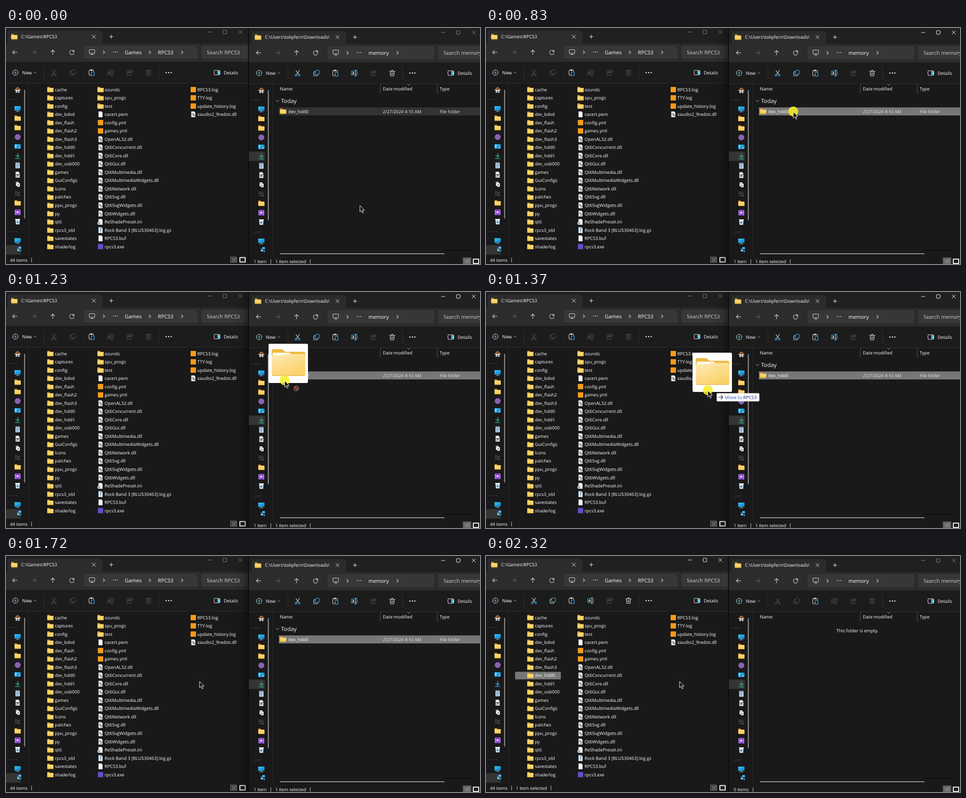
Recreate the animation shown at these times as an HTML page. Size 1058x529 px, loop 4.11 s.

```html
<!DOCTYPE html>
<html lang="en">
<head>
<meta charset="utf-8">
<title>Moving a folder between windows</title>
<style>
  html, body { margin: 0; width: 100%; height: 100%; overflow: hidden; background: #191919; }
  svg { display: block; }
  #stage { width: 100vw; height: 100vh; }
  text { font-family: "Open Sans", "Noto Sans", sans-serif; text-rendering: geometricPrecision; white-space: pre; }
</style>
</head>
<body>
<svg id="stage" viewBox="0 0 1058 529">
  <defs>
    <linearGradient id="gold" x2="0" y2="1"><stop stop-color="#ffe08a"/><stop offset="1" stop-color="#f7c242"/></linearGradient>
    <linearGradient id="pale" x2=".6" y2="1"><stop stop-color="#ffecb8"/><stop offset="1" stop-color="#fad06a"/></linearGradient>
    <linearGradient id="sky" x2="1" y2="1"><stop stop-color="#3cc8f4"/><stop offset="1" stop-color="#0f78c8"/></linearGradient>
    <linearGradient id="shade"><stop stop-opacity="0"/><stop offset=".6" stop-opacity=".08"/><stop offset="1" stop-opacity=".3"/></linearGradient>
  </defs>
</svg>
<script>
const LOOP = 4110, FOCUS = 560, DRAG = 1020, OVER = 1300, DROP = 1720, DONE = 1980, MOVED = 2180, TOOLS = 2250;
const WHITE = '#f4f4f4', BLUE = '#4cc2ff', DIM = '#565656', DIMBLUE = '#3f5566';

// Drawing helpers
const rect = (x, y, w, h, fill, r = 0, more = '') =>
  `<rect x="${x}" y="${y}" width="${w}" height="${h}" rx="${r}" fill="${fill}" ${more}/>`;
const frame = (x, y, w, h, c, r = 0, sw = 1) => rect(x, y, w, h, 'none', r, `stroke="${c}" stroke-width="${sw}"`);
const dot = (x, y, r, fill) => `<circle cx="${x}" cy="${y}" r="${r}" fill="${fill}"/>`;
const line = (d, c = WHITE, w = 1.1) =>
  `<path d="${d}" fill="none" stroke="${c}" stroke-width="${w}" stroke-linecap="round" stroke-linejoin="round"/>`;
const shape = (d, fill) => `<path d="${d}" fill="${fill}"/>`;
const text = (x, y, s, size = 10, fill = '#fff', more = '') =>
  `<text x="${x}" y="${y + size * .36}" font-size="${size}" fill="${fill}" ${more}>${s}</text>`;
const put = (x, y, s) => `<g transform="translate(${x} ${y})">${s}</g>`;
const during = (from, to, s) => `<g data-from="${from}" data-to="${to}">${s}</g>`;
const swap = (time, before, after) => during(0, time, before) + during(time, LOOP, after);
const dots = (x, y, gap, r) => [-gap, 0, gap].map(d => dot(x + d, y, r, WHITE)).join('');
const chevron = (x, y) => put(x, y, line('M-1.8-3.4L1.8 0L-1.8 3.4', '#ddd'));
const caret = (x, y, s = 2.5) => put(x, y, line(`M${-s} ${-s / 2}L0 ${s / 2}L${s} ${-s / 2}`, '#bbb', 1));
const cross = (x, y, s, c) => put(x, y, line(`M${-s} ${-s}L${s} ${s}M${s} ${-s}L${-s} ${s}`, c, 1));

// File icons, centred on the origin
const folder = shape('M-7-5.2Q-7-6-6-6H-2L0-4H6Q7-4 7-3V4H-7Z', '#e5a32b') + rect(-7, -3, 14, 9, 'url(#gold)', 1);
const page = shape('M-4.5-6.5H2L4.5-4V6.5H-4.5Z', '#f5f5f5') + shape('M2-6.5V-4H4.5Z', '#b5b5b5');
const gear = (x, y, r) => `<circle cx="${x}" cy="${y}" r="${r}" fill="none" stroke="#70757a" stroke-width="1.3"/>`;
const icons = {
  d: folder,
  p: page,
  s: rect(-6, -6, 12, 12, '#f59a1c', 1),
  g: page + gear(-1, -.8, 1.7) + gear(1.8, 2.6, 1.5),
  i: page + dot(-3.5, 3, 3.6, '#d5d5d5') + dot(-3.5, 3, 1.3, '#555'),
  z: page + rect(-1.5, -5, 3, 8, '#3b8fc4') + rect(-.5, -3, 1, 5, '#d6ecf8'),
  x: rect(-6, -6, 12, 12, '#5b50c8', 2)
};

// Navigation pane icons
const monitor = rect(-7, -6, 14, 10, 'url(#sky)', 1) + rect(-1, 4, 2, 2, '#8aa') + rect(-4, 5.5, 8, 1, '#9bb');
const arrowDown = c => line('M0-6V3M-4-1L0 3L4-1M-5 6H5', c, 1.5);
const note = rect(-5, -6, 10, 13, '#b9d2e6', 1) + line('M-3-2H3M-3 1H3M-3 4H1', '#55788f', 1) + rect(-5, -6, 10, 2, '#7fa3bf');
const home = rect(-4.5, -1, 9, 7, '#d0d0d0', 1) + line('M-6 0L0-5.5L6 0', '#e0843c', 2) + rect(-1.3, 2, 2.6, 4, '#555');
const display = rect(-7, -5, 14, 10, 'url(#sky)', 1) + rect(-5, -3, 2, 2, '#fff') + rect(-5, 1, 2, 2, '#fff') + rect(2, 2, 4, 1.5, '#cdf');
const tool = page + line('M-2 4L3-2M-3-1L2 3', '#333', 1.6);
const sheet = rect(-4, -5, 6, 9, '#eee') + rect(-1, -2, 6, 8, '#fff') + line('M0 1H3M0 3H3M-3-3H0', '#444', 1);
const term = rect(-6, -5, 12, 11, '#262a2e') + line('M-5-4H-2M-5-1H-3M0-1H3M-1 4H5', '#68798a', 1);
const film = rect(-6.5, -6.5, 13, 13, '#8a43d0', 1.5) + line('M-5-4V5M5-4V5', '#dcc3f5', 1.2) + shape('M-2-3L3 0L-2 3Z', '#fff');
const bin = shape('M-5-6H5L4 6H-4Z', '#d9e3ea') + dot(0, 1, 2.4, '#3d8fd1') + line('M-5-5.5H5', '#fff', 1.4);
const network = rect(0, -6, 7, 5, '#45b4ec') + rect(-3, 0, 5, 4, '#7dcaf0') + rect(3, 1, 5, 4, '#2d8fd0') + line('M-2-3V0', '#9cc');

// Command bar icons: a is the main colour, b the accent
const commands = {
  cut: (a, b) => line('M-4-6L2.6 3M4-6L-2.6 3', a) + line('M-5.6 4.8a2 2 0 1 0 4 0a2 2 0 1 0-4 0M1.6 4.8a2 2 0 1 0 4 0a2 2 0 1 0-4 0', b),
  copy: (a, b) => frame(-2.5, -6, 8.5, 9, b, 2, 1.1) + line('M-3-3.2H-4.5Q-6-3.2-6-1.7V4.4Q-6 6-4.5 6H1Q2.5 6 2.6 4', a),
  paste: (a, b) => line('M-1 6H-4Q-5.5 6-5.5 4.5V-4Q-5.5-5.5-4-5.5H3Q4.5-5.5 4.5-4V-3', a) + frame(-2.8, -7, 4.6, 2.4, a, 1) + frame(0, -1.5, 6, 8.5, b, 1.5, 1.2),
  rename: (a, b) => line('M1-4.5H-5Q-6.5-4.5-6.5-3V3Q-6.5 4.5-5 4.5H1M5-4.5Q6.5-4.5 6.5-3V3Q6.5 4.5 5 4.5', b) + line('M3-6.5V6.5M1.7-6.5H4.3M1.7 6.5H4.3M-4.3 2.5L-2.2-2.5L0 2.5M-3.5 .8H-.8', a),
  share: (a, b) => line('M-1-4H-4Q-5.5-4-5.5-2.5V4Q-5.5 5.5-4 5.5H3Q4.5 5.5 4.5 4V3', a) + line('M2-6L6-2.5L2 1V-1Q-1.5-1-3 2Q-2.5-3.5 2-4Z', b),
  del: a => line('M-6-4H6M-2-4Q-2-6.2 0-6.2Q2-6.2 2-4M-4.7-4L-4 5Q-3.8 6.5-2.5 6.5H2.5Q3.8 6.5 4 5L4.7-4M-1.3-1V3.5M1.3-1V3.5', a)
};
const command = (name, x, on) => put(x, 100, commands[name](on ? WHITE : DIM, on ? BLUE : DIMBLUE));
// Commands that need a selection change state together
const commandBar = selectedFirst => [['cut', 107], ['copy', 149], ['rename', 233.5], ['del', 318]]
  .map(([n, x]) => swap(TOOLS, command(n, x, selectedFirst), command(n, x, !selectedFirst))).join('')
  + command('paste', 191, true) + command('share', 276, false);

// Title bar, address row, command bar and navigation pane share one layout
function chrome(o) {
  const [on, off] = o.focus;
  const buttons = c => line(`M${o.min - 4} 9H${o.min + 4}`, c, 1) + frame(o.min + 29.5, 5, 8, 8, c, 1) + cross(o.min + 68, 9, 4, c);
  let s = rect(-3, -1, 1100, 540, '#191919') + rect(-3, -1, 1100, 37, '#202020') + rect(-3, 35, 1100, 41, '#2c2c2c')
    + rect(-3, 76, 1100, 48, '#1c1c1c') + rect(-3, 123.5, 1100, 1, '#303030')
    + shape('M0 35Q4 35 4 31V12Q4 6 10 6H209Q215 6 215 12V31Q215 35 219 35Z', '#2c2c2c');
  s += put(18.5, 19.5, folder) + `<svg x="34" y="8" width="144.5" height="24">${text(0, 11.5, o.path, 10.2, '#fff', 'font-weight="500"')}</svg>`
    + cross(196, 19.5, 3.7, WHITE) + line('M231 19.5H239M235 15.5V23.5')
    + during(0, on, buttons('#858585')) + during(on, off, buttons('#fff')) + during(off, LOOP, buttons('#858585'));
  const back = 'M5 0H-5M-1-4.2L-5 0L-1 4.2';
  s += put(20, 54.5, line(back, '#ddd')) + `<g transform="translate(62 54.5) scale(-1 1)">${line(back, '#626262')}</g>`
    + put(104.5, 54.5, line('M0 5V-5M-4.2-1L0-5L4.2-1', '#ddd'))
    + put(147, 54.5, line('M4.6-1.8A5 5 0 1 0 5 1M4.8-5V-1.6H1.4', '#ddd'));
  s += rect(174, 40, o.boxEnd - 174, 29, '#373737', 4) + rect(o.boxEnd + 8.5, 40, 130, 29, '#373737', 4)
    + put(192, 54, frame(-6, -5.5, 12, 8.5, '#ddd', 1.5, 1.1) + line('M-3 5.5H3M0 3V5.5', '#ddd'))
    + chevron(218.5, 54.5) + dots(244, 54, 4, .9)
    + o.crumbs.map(([x, name, c]) => text(x, 54.5, name, 11.6) + chevron(c, 54.5)).join('')
    + text(o.boxEnd + 20.5, 54.5, o.search, 11.6, '#cfcfcf');
  s += put(21, 100, `<circle r="6" fill="none" stroke="${WHITE}"/>` + line('M-3 0H3M0-3V3', BLUE)) + text(36, 100, 'New', 10.5) + caret(65, 100)
    + rect(84.5, 87, 1, 27, '#353535') + rect(340.5, 87, 1, 27, '#353535') + dots(363, 100, 5.5, 1.4)
    + put(o.details, 100, frame(-6.5, -5, 13, 10, WHITE, 1.5) + rect(1, -4, 5, 8, BLUE, 1)) + text(o.details + 15, 100, 'Details', 10.1)
    + commandBar(o.right);

  const green = arrowDown('#2fb69a');
  const downloads = o.right ? green : swap(TOOLS, green, arrowDown('#4aa8ee'));
  const nav = [monitor, folder, folder, dot(0, 0, 6.5, '#8a63b8'), display, downloads, note, tool, sheet, term, folder, film, bin];
  s += (o.right ? rect(-2, 276, 36, 21, '#343434') : rect(0, 487, 33, 21, '#343434'))
    + put(26, 139, home) + rect(6, 159.5, 20, 1, '#3d3d3d') + nav.map((n, i) => put(26, 181 + i * 21.1, n)).join('')
    + rect(6, 456, 20, 1, '#3d3d3d') + put(26, 477, monitor) + put(28, 496, network) + rect(34, 484, 12, 26, '#191919')
    + rect(40.5, 138, 2, o.right ? 292 : 289, '#9b9b9b', 1) + rect(50.5, 124, 1, 386, '#2e2e2e');
  return s;
}

// The lists: icon key, then name; ~ stands for a space
const columns = [
  [99, 109, 'd:cache d:captures d:config d:dev_bdvd d:dev_flash d:dev_flash2 d:dev_flash3 d:dev_hdd0 d:dev_hdd1 d:dev_usb000 d:games d:GuiConfigs d:Icons d:patches d:ppu_progs d:py d:qt6 d:rpcs3_old d:savestates d:shaderlog'],
  [211, 220, 'd:sounds d:spu_progs d:test p:cacert.pem s:config.yml s:games.yml g:OpenAL32.dll g:Qt6Concurrent.dll g:Qt6Core.dll g:Qt6Gui.dll g:Qt6Multimedia.dll g:Qt6MultimediaWidgets.dll g:Qt6Network.dll g:Qt6Svg.dll g:Qt6SvgWidgets.dll g:Qt6Widgets.dll i:ReShadePreset.ini z:Rock~Band~3~[BLUS30463].log.gz p:RPCS3.buf x:rpcs3.exe'],
  [418, 427, 's:RPCS3.log s:TTY.log s:update_history.log g:xaudio2_9redist.dll']
];
const files = columns.map(([ix, tx, names]) => names.split(' ').map((n, i) => {
  const y = 138 + i * 18.53;
  return put(ix, y, icons[n[0]]) + text(tx, y, n.slice(2).replaceAll('~', ' '));
}).join('')).join('');

const bar = (x, y) => rect(x, y - 5, 1, 10, '#ddd');
const views = (x, y) => frame(x + .5, y - 6, 13, 12, '#9a9a9a') + line(`M${x + 3} ${y - 3}H${x + 12}M${x + 3} ${y}H${x + 12}M${x + 3} ${y + 3}H${x + 12}`, '#ddd')
  + rect(x + 20, y - 6, 14, 12, '#fff', 1) + rect(x + 22, y - 4, 10, 8, '#222');

const leftWindow = chrome({
  right: false, path: 'C:\\Games\\RPCS3', min: 455, focus: [DONE, LOOP], boxEnd: 427.5, search: 'Search RPCS3', details: 471,
  crumbs: [[265, 'Games', 321], [339, 'RPCS3', 393]]
})
  + during(MOVED, LOOP, rect(65, 259.5, 102, 17, '#777'))
  + files
  + during(DONE, MOVED, frame(383.5, 148.5, 135, 16.5, '#7a7a7a'))
  + text(9, 520, '44 items', 9.8) + bar(56.5, 520) + during(MOVED, LOOP, text(67, 520, '1 item selected', 9.8) + bar(144.5, 520))
  + views(501, 519.5)
  + during(FOCUS, DONE, rect(501, 0, 39, 529, 'url(#shade)'));

const row = fill => rect(609, 178, 460, 18, fill);
const rightWindow = rect(540, 0, 518, 529, '#0c0c0c') + `<svg x="542" y="0" width="516" height="529">` + put(2, 1, chrome({
  right: true, path: 'C:\\Users\\tobyfern\\Downloads\\', min: 432, focus: [FOCUS, DONE], boxEnd: 412, search: 'Search memory', details: 449,
  crumbs: [[265, 'memory', 330]]
})) + '</svg>'
  + text(611, 136.5, 'Name', 10.2) + text(841, 136.5, 'Date modified') + text(968, 136.5, 'Type')
  + rect(835, 126, 1, 21, '#585858') + rect(962, 126, 1, 21, '#585858') + caret(899, 127.5)
  + during(0, MOVED, during(0, 490, row('#333')) + during(490, DONE, row('#777')) + during(DONE, MOVED, row('#333'))
    + caret(606, 163.5, 3.6) + text(614, 163.5, 'Today', 12.6)
    + put(618.5, 186.5, folder) + text(630, 187, 'dev_hdd0') + text(841, 187, '2/27/2024 4:10 AM', 9.8, '#e4e4e4') + text(968, 187, 'File folder', 9.9, '#e4e4e4')
    + text(553, 523.5, '1 item', 9.8) + bar(590.5, 523.5) + text(601, 523.5, '1 item selected', 9.8) + bar(678.5, 523.5))
  + during(MOVED, LOOP, text(782, 167.5, 'This folder is empty.') + text(553, 523.5, '0 items', 9.8) + bar(595.5, 523.5))
  + rect(611, 505, 368, 2, '#9b9b9b', 1) + rect(979, 498, 67, 1, '#000')
  + rect(1019, 514, 20, 15, '#4a4a4a') + views(1022, 523);

const bigFolder = shape('M7 16Q7 12 11 12H29Q31 12 33 14L37 18H78Q82 18 82 22V60H7Z', '#eeb945')
  + rect(9, 20, 40, 12, '#fff8e6', 2) + shape('M7 29Q7 26 11 26H34Q36 26 38 24L40 23H78Q82 23 82 27V68Q82 72 78 72H11Q7 72 7 68Z', 'url(#pale)')
  + rect(8, 71, 73, 1, '#d9a53a');
const forbidden = put(62, 100, dot(0, 0, 5.5, '#3a2624') + `<circle r="5" fill="none" stroke="#b57068" stroke-width="1.6"/>` + line('M-3.4-3.4L3.4 3.4', '#b57068', 1.6));
const label = put(54, 91, rect(0, 0, 95, 18, '#fff', 2, 'stroke="#c8c8c8" stroke-width=".6"') + line('M3.5 9H13M9.5 5L13.5 9L9.5 13', '#222', 1.2)
  + text(18, 9, 'Move to <tspan fill="#17178c">RPCS3</tspan>', 10.2, '#2a4fc4'));

const overlay = during(DRAG, DROP, `<g id="ghost">${rect(0, 0, 88, 88, '#fff', 3)}${during(1160, DROP, bigFolder)}${during(DRAG, OVER, forbidden)}${during(OVER, DROP, label)}</g>`)
  + `<g id="cursor">${during(FOCUS, DROP, `<circle cy="-1" r="11" fill="#f6ee22" fill-opacity=".86"/>`)}`
  + `<path d="M0 0V14.2L3.3 11.2L5.6 16.6L8 15.6L5.7 10.3H10.2Z" fill="#111" stroke="#fff" stroke-linejoin="round"/></g>`;

const stage = document.getElementById('stage');
stage.insertAdjacentHTML('beforeend', leftWindow + rightWindow + overlay);

// time, pointer x, y, dragged image x, y
const path = [
  [490, 675, 190, 637, 106], [560, 675, 189, 637, 106], [DRAG, 695, 187, 657, 105], [1090, 697, 187, 659, 105],
  [1160, 678, 190, 641, 108], [1230, 622, 199, 586, 116], [1300, 551, 210, 516, 126], [1370, 495, 221, 461, 136],
  [1440, 466, 239, 428, 154], [1580, 437, 272, 395, 187], [1650, 432, 283, 390, 198], [DROP, 432, 281, 390, 198]
];
function pose(t) {
  const tick = t < 560 ? t - t % 70 : t - (t - 40) % 70;
  if (tick < 490) {
    const k = tick / 490, e = k * k * (3 - 2 * k);
    return [790 - 115 * e, 398 - 208 * e, 0, 0];
  }
  const i = path.findIndex(p => p[0] > tick);
  if (i < 0) return path[path.length - 1].slice(1);
  const a = path[i - 1], b = path[i], k = (tick - a[0]) / (b[0] - a[0]);
  return a.slice(1).map((v, n) => v + (b[n + 1] - v) * k);
}

const cursor = document.getElementById('cursor'), ghost = document.getElementById('ghost');
const timed = [...stage.querySelectorAll('[data-from]')].map(el => [el, +el.dataset.from, +el.dataset.to]);
const start = performance.now();
function draw() {
  const t = (performance.now() - start) % LOOP;
  for (const [el, from, to] of timed) el.style.display = t >= from && t < to ? '' : 'none';
  const [x, y, gx, gy] = pose(t);
  cursor.setAttribute('transform', `translate(${x} ${y})`);
  ghost.setAttribute('transform', `translate(${gx} ${gy})`);
  requestAnimationFrame(draw);
}
draw();
</script>
</body>
</html>
```
